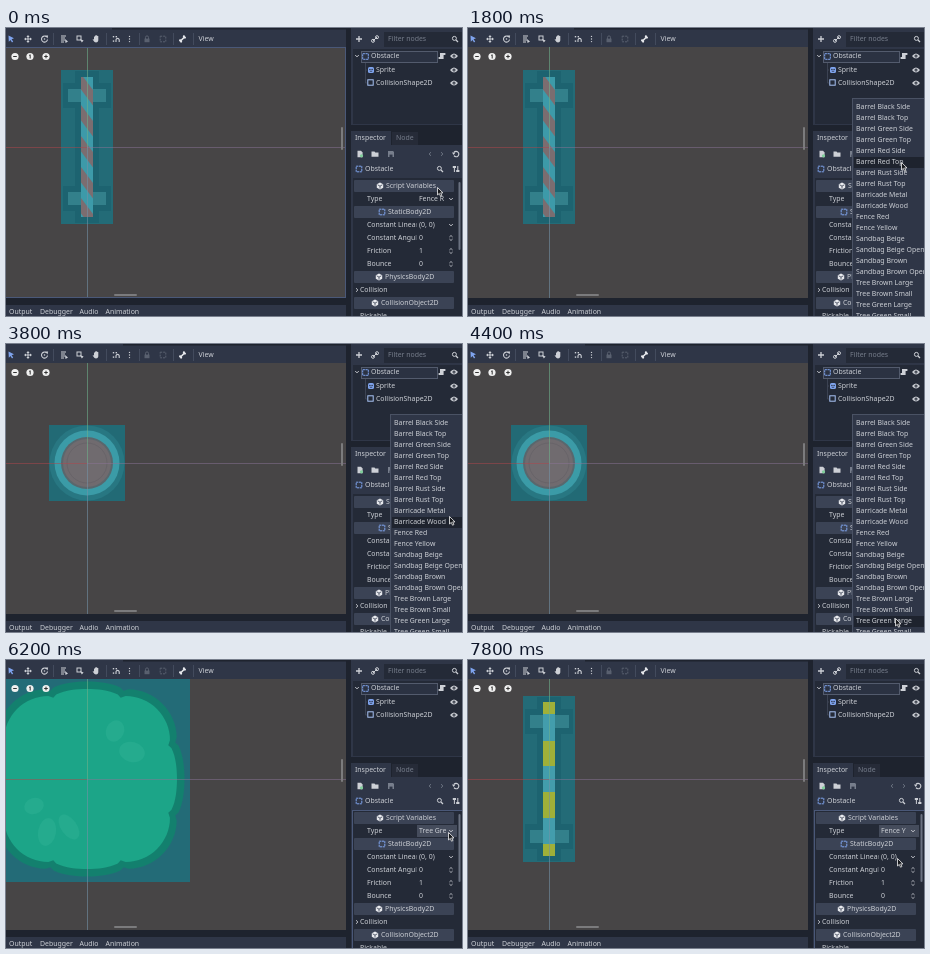
Recreate the animation shown at these times as an HTML page. Size 456 by 288 pixels, loop 8.2 s.

```html
<!DOCTYPE html>
<html lang="en">
<head>
<meta charset="utf-8">
<title>Obstacle inspector</title>
<style>
html, body { margin: 0; width: 100%; height: 100%; overflow: hidden; background: #202531; }
svg { display: block; width: 456px; height: 288px; }
text { font: 6.93px "Noto Sans", "Open Sans", sans-serif; fill: #cdd0d6; white-space: pre; }
</style>
</head>
<body>
<svg id="stage" viewBox="0 0 456 288" xmlns="http://www.w3.org/2000/svg"></svg>
<script>
const BASE = '#2f3647', DARK = '#242a37', DEEP = '#1e232e', HEAD = '#3b4355';
const TEXT = '#cdd0d6', DIM = '#777e8c', BLUE = '#7fa4ee';
const LOOP = 8200, STEP = 1000 / 15;

// Markup helpers
const rect = (x, y, w, h, fill, more = '') =>
  `<rect x="${x}" y="${y}" width="${w}" height="${h}" fill="${fill}" ${more}/>`;
const circle = (x, y, r, fill, more = '') =>
  `<circle cx="${x}" cy="${y}" r="${r}" fill="${fill}" ${more}/>`;
const line = (d, stroke = TEXT, width = 1, more = '') =>
  `<path d="${d}" fill="none" stroke="${stroke}" stroke-width="${width}" ${more}/>`;
const shape = (d, fill = TEXT) => `<path d="${d}" fill="${fill}"/>`;
const label = (x, y, s, fill = TEXT, more = '') =>
  `<text x="${x}" y="${y + 2.3}" style="fill:${fill}" ${more}>${s}</text>`;
const group = (id, body, more = '') => `<g id="${id}" ${more}>${body}</g>`;
const at = (x, y, body) => `<g transform="translate(${x} ${y})">${body}</g>`;

// Icons, centred on 0,0
const icon = {
  arrow: shape('M-2.5-3.5L3-.8.6.3 2.2 2.6 1 3.4-.5 1.1-2.2 2.8Z', BLUE),
  move: line('M-3 0H3M0-3V3', TEXT, 1) + shape('M0-4L1.6-2H-1.6ZM0 4L1.6 2H-1.6ZM-4 0L-2-1.6V1.6ZM4 0L2-1.6V1.6Z'),
  rotate: line('M2-2.2A3 3 0 1 0 3 .5', TEXT, 1.1) + shape('M.6-3.6L3.6-3.4 3-.6Z') + circle(0, 0, .8, TEXT),
  list: line('M-3-3H2M-3-1H1M-3 1H1M-3 3H0', TEXT, 1.1) + shape('M1 0L4 2.4 1.5 4Z'),
  pivot: rect(-3, -3, 4, 4, 'none', `stroke="${TEXT}"`) + shape('M0 0L3.6 1.6 1.8 3.6Z'),
  hand: shape('M-2-1V-2.4H-1V-3.4H.2V-3.8H1.2V-3H2.3V1.5Q2 3.6 0 3.6-1.6 3.4-3.4.4L-2.6 0-2 1Z'),
  snap: rect(-3.2, -3, 1.4, 1.4, TEXT) + rect(-.4, -3, 1.4, 1.4, TEXT) + rect(-3.2, 1.4, 1.4, 1.4, TEXT) +
        line('M0 3V1A1.6 1.6 0 0 1 3.2 1V3', TEXT, 1.1),
  dots: circle(0, -2.6, .7, TEXT) + circle(0, 0, .7, TEXT) + circle(0, 2.6, .7, TEXT),
  lock: rect(-2.5, -.4, 5, 3.6, '#59606f') + line('M-1.5 0V-1.6A1.5 1.5 0 0 1 1.5-1.6V0', '#59606f'),
  frame: rect(-2.8, -2.8, 5.6, 5.6, 'none', 'stroke="#59606f" stroke-dasharray="2 1"'),
  bone: line('M-2 2L2-2', '#e8eaee', 1.6) + circle(-2.4, 1.4, 1.1, '#e8eaee') + circle(-1.4, 2.6, 1.1, '#e8eaee') +
        circle(2.4, -1.4, 1.1, '#e8eaee') + circle(1.4, -2.6, 1.1, '#e8eaee'),
  plus: line('M-3 0H3M0-3V3', TEXT, 1.3),
  link: line('M-.6.6L2-2M-2 2L.6-.6', TEXT, 1) + circle(2, -1.8, 1.5, 'none', `stroke="${TEXT}"`) +
        circle(-2, 1.8, 1.5, 'none', `stroke="${TEXT}"`),
  lens: circle(-.6, -.6, 2, 'none', `stroke="${TEXT}"`) + line('M1 1L3 3', TEXT, 1.3),
  script: shape('M-2-3H3.4V-1H1.6V3H-3.4V1H-2Z'),
  eye: shape('M-4 0Q0-5 4 0 0 5-4 0Z') + circle(0, 0, 1.5, DARK) + circle(0, 0, .6, TEXT),
  body: rect(-2.8, -2.8, 5.6, 5.6, 'none', `stroke="${BLUE}" stroke-dasharray="2.2 .6"`),
  box: rect(-2.7, -2.7, 5.4, 5.4, 'none', 'stroke="#a9c4f5"'),
  cube: shape('M0-3.6L3.2-1.8V1.8L0 3.6-3.2 1.8V-1.8Z', '#e8eaee') + line('M-2.4-1.2L0 .1 2.4-1.2M0 0V2.7', HEAD, .8),
  sprite: rect(-3, -3, 6, 6, BLUE, 'rx="1.6"') + circle(-1.1, -.5, .7, DARK) + circle(1.1, -.5, .7, DARK) +
          line('M-1.2 1.3H1.2', DARK, .7),
  page: shape('M-2.5-3.3H1L2.6-1.6V3.3H-2.5Z') + circle(1.5, 1.8, 1.6, '#7fcf9a'),
  folder: shape('M-3.5-2.6H-.5L.3-1.6H3.5V2.8H-3.5Z'),
  disk: shape('M-3-3H2L3-2V3H-3Z', DIM) + rect(-1.5, .6, 3, 2.4, BASE),
  history: line('M-2-1.6A2.7 2.7 0 1 1-2 1.7', TEXT, 1.1) + shape('M-4-1.5H-.6L-2.3 1Z'),
  tools: line('M-1.6-3V3M1.8-3V3', TEXT, 1) + shape('M-3.2-1H0V-3H-3.2ZM.2 1H3.4V3H.2Z'),
  down: line('M-1.8-1L0 .9 1.8-1', TEXT, .9),
  right: line('M-1-1.8L.9 0-1 1.8', TEXT, .9),
  left: line('M1-1.8L-.9 0 1 1.8', DIM, .9),
  spin: line('M-1.6-1L0-2.5 1.6-1M-1.6 1L0 2.5 1.6 1', TEXT, .8)
};
const put = (name, x, y) => at(x, y, icon[name]);

function redFence() {
  let stripes = '';
  for (let y = 15; y < 200; y += 31) stripes += `M75 ${y}l12 16v15.5l-12-16Z`;
  const posts = [61, 164].map(y => rect(57, y - 6, 48, 25, '#1d6370') +
    rect(62, y, 13, 13, '#33808b') + rect(87, y, 13, 13, '#33808b')).join('');
  return rect(55, 42, 52, 154, '#236b77') + rect(69, 43, 24, 152, '#1d6370') + posts +
    rect(75, 49, 12, 140, '#3d9aa9') +
    `<clipPath id="beam"><rect x="75" y="49" width="12" height="140"/></clipPath>
     <g clip-path="url(#beam)">${shape(stripes, '#7b6d70')}</g>`;
}

function yellowFence() {
  const posts = [55, 170].map(y => rect(57, y - 6, 48, 25, '#1d6370') + rect(62, y, 39, 13, '#33808b')).join('');
  const bands = [[42, 12], [81, 25], [132, 26], [184, 12]];
  return rect(55, 36, 52, 166, '#236b77') + rect(69, 37, 24, 164, '#1d6370') + posts +
    rect(75, 42, 12, 154, '#439dac') +
    bands.map(([y, h]) => rect(75, y, 12, h, '#9fb039')).join('');
}

function barrel() {
  return rect(43, 81, 76, 76, '#226a75') + circle(81, 119, 37.5, '#287782') +
    circle(81, 119, 32.5, '#3b9ba7') + circle(81, 119, 26, '#59676d') +
    circle(81, 119, 24, '#706b6f') + circle(81, 119, 20, 'none', 'stroke="#686469"');
}

// Eight lobes, longer on the diagonals
function blob(inset) {
  const pts = [];
  for (let a = 0; a < 360; a += 2.5) {
    const t = a * Math.PI / 180;
    const r = 91 + 6.5 * Math.sqrt(Math.abs(Math.cos(4 * t))) + 9 * Math.sin(2 * t) ** 2 - inset;
    pts.push((81 + r * Math.cos(t)).toFixed(1) + ' ' + (119 + r * Math.sin(t)).toFixed(1));
  }
  return 'M' + pts.join('L') + 'Z';
}

function tree() {
  const spots = [[109, 71, 9, 11, 25], [126, 92, 13, 10, 15], [28, 146, 10, 8, -20], [41, 172, 9, 14, 10], [63, 167, 8, 14, -35]];
  return rect(-22, 19, 206, 203, '#236b77') + shape(blob(0), '#13806e') + shape(blob(7.5), '#1ca588') +
    spots.map(([x, y, rx, ry, turn]) =>
      `<ellipse rx="${rx}" ry="${ry}" transform="translate(${x} ${y}) rotate(${turn})" fill="#25ab8e"/>`).join('');
}

function viewport() {
  const tools = [['arrow', 5], ['move', 22], ['rotate', 38.5], ['list', 58], ['pivot', 74], ['hand', 90],
    ['snap', 110], ['dots', 123.5], ['lock', 141], ['frame', 157], ['bone', 176.5]];
  const zoom = [9, 24, 40].map((x, i) => circle(x, 28.5, 3.6, '#f0f0f0') +
    line(['M-1.8 0H1.8', 'M-.8-1L.2-1.8V2', 'M-1.8 0H1.8M0-1.8V1.8'][i], '#333', 1,
      `transform="translate(${x} 28.5)"`)).join('');
  return rect(0, 0, 340, 19, BASE) + rect(0, 0, 240, 1.5, DEEP, 'id="tabs"') +
    tools.map(([n, x]) => put(n, x, 11)).join('') +
    line('M47.5 5V17M100.5 5V17M133.5 5V17M167.5 5V17M187.5 5V17', '#434b5d', 1) + label(192.5, 11, 'View') +
    rect(0, 19, 340, 251, '#474546') +
    `<clipPath id="view"><rect y="19" width="340" height="251"/></clipPath>` +
    group('sprites', group('s0', redFence()) + group('s1', barrel()) + group('s2', tree()) + group('s3', yellowFence()),
      'clip-path="url(#view)"') +
    line('M0 119.5H81', '#b0474c', 1, 'opacity=".5"') +
    line('M81 119.5H340', '#8a7595', 1, 'opacity=".5"') +
    line('M81.5 19V119', '#6fb08a', 1, 'opacity=".6"') +
    line('M81.5 119V270', '#7492a5', 1, 'opacity=".6"') + zoom +
    rect(108, 266, 23, 2, '#7b7b7d', 'rx="1"') + rect(335, 99, 2, 23, '#7b7b7d', 'rx="1"') +
    rect(-1, 19.5, 340.5, 250, 'none', 'id="viewFocus" stroke="#4a5878"') +
    rect(0, 277, 340, 11, BASE) +
    [[3, 'Output'], [34, 'Debugger'], [73.5, 'Audio'], [99.5, 'Animation']].map(([x, s]) => label(x, 284, s)).join('');
}

function sceneDock() {
  return rect(345, 0, 111, 97, BASE) + put('plus', 353, 11) + put('link', 369, 11) +
    rect(378, 4, 78, 15, DARK) + label(382, 11, 'Filter nodes', DIM) + put('lens', 449, 11) +
    rect(347, 21, 109, 75, DARK) +
    rect(355.5, 23.5, 76, 11, '#2b3242', 'stroke="#535b6d"') +
    line('M359.5 35V55H361M359.5 42H361', '#3c4353', 1) +
    put('down', 351, 28) + put('body', 359.5, 28.5) + label(365, 28, 'Obstacle') +
    put('sprite', 365, 42) + label(370, 41.7, 'Sprite') +
    put('box', 364.5, 54.5) + label(370, 54.4, 'CollisionShape2D') +
    put('script', 436, 28) + [28, 42, 55].map(y => put('eye', 448, y)).join('');
}

function inspector() {
  const head = (y, s, x, name) => rect(348, y - 6, 100, 12, HEAD, 'rx="1"') + put(name, x - 6, y) + label(x, y, s);
  const row = (y, name, value, mark) => label(361, y, name, TEXT, 'clip-path="url(#names)"') +
    label(413, y, value) + put(mark, 445, y);
  return rect(345, 103, 40, 15, BASE) + rect(386, 104, 26, 13, '#262b38') +
    label(349, 110, 'Inspector') + label(390, 110, 'Node', DIM) +
    rect(345, 117, 111, 171, BASE) + put('page', 354, 126) + put('folder', 369, 126) + put('disk', 385, 126) +
    put('left', 424, 126) + at(436, 126, line('M-1-1.8L.9 0-1 1.8', DIM, .9)) + put('history', 450, 126) +
    put('body', 353, 141) + label(359, 141, 'Obstacle') + put('lens', 434, 141) + put('tools', 450, 141) +
    rect(347, 150, 109, 138, DARK) +
    '<clipPath id="names"><rect x="348" y="150" width="62.5" height="138"/></clipPath>' +
    '<clipPath id="value"><rect x="411" y="164" width="30" height="14"/></clipPath>' +
    head(158, 'Script Variables', 380, 'cube') +
    rect(411, 165, 40, 12, '#454c5c', 'id="field"') +
    label(361, 171, 'Type') + label(413, 171, '', TEXT, 'id="type" clip-path="url(#value)"') + put('down', 445, 171) +
    head(184, 'StaticBody2D', 382, 'body') +
    row(197, 'Constant Linear', '(0, 0)', 'down') + row(210, 'Constant Angular', '0', 'spin') +
    row(223, 'Friction', '1', 'spin') + row(236, 'Bounce', '0', 'spin') +
    head(249, 'PhysicsBody2D', 379, 'cube') +
    put('right', 351, 262) + label(354, 262, 'Collision') +
    head(275, 'CollisionObject2D', 375, 'cube') + label(354, 288, 'Pickable') +
    rect(452.5, 154, 2, 68, '#6b7281', 'rx="1"') +
    rect(346.5, 150.5, 112, 140, 'none', 'id="focus" stroke="#4a5878"');
}

const kinds = ['Barrel Black', 'Barrel Green', 'Barrel Red', 'Barrel Rust'].flatMap(s => [s + ' Side', s + ' Top'])
  .concat('Barricade Metal', 'Barricade Wood', 'Fence Red', 'Fence Yellow')
  .concat(['Sandbag Beige', 'Sandbag Brown'].flatMap(s => [s, s + ' Open']))
  .concat(['Tree Brown', 'Tree Green'].flatMap(s => [s + ' Large', s + ' Small']));

function menu() {
  return rect(384.5, 70.5, 80, 230, BASE, 'stroke="#4a5264"') +
    rect(386, 74, 70, 11, DEEP, 'id="hover"') +
    kinds.map((s, i) => label(388, 79 + 11 * i, s)).join('');
}

const stage = document.getElementById('stage');
stage.innerHTML = rect(0, 0, 456, 288, DEEP) + viewport() + sceneDock() + inspector() + group('menu', menu()) +
  group('cursor', '<path d="M.5.5V8L2.3 6.4 3.5 9.2 4.9 8.6 3.7 5.9H6Z" fill="#16181c" stroke="#f4f4f4" stroke-width=".8"/>');

const get = id => document.getElementById(id);
const show = (id, on) => get(id).setAttribute('visibility', on ? 'visible' : 'hidden');

// Pointer keys: step, x, y
const path = [
  [0, 431, 159], [6, 442, 175], [9, 443, 171], [21, 443, 171], [27, 433, 134], [38, 433, 134],
  [41, 437, 158], [43, 437, 158], [46, 441, 164], [49, 441, 164], [51, 443, 169], [56, 443, 169],
  [66, 427, 274], [76, 427, 274], [77, 426, 274], [80, 426, 274], [86, 445, 181], [88, 445, 181],
  [93, 442, 172], [97, 442, 172], [103, 434, 188], [109, 434, 188], [113, 429, 198], [123, 429, 198]
];
// Menu spans: opened, first hover, closed
const spans = [[15, 22, 33], [53, 57, 72], [95, 98, 117]];
const swaps = [0, 34, 72, 117];
const values = ['Fence Red', 'Barrel Red Top', 'Tree Green Large', 'Fence Yellow'].map((s, i) => s.slice(0, [7, 8, 8, 7][i]));

function pointer(n) {
  const i = path.findIndex((k, j) => j > 0 && n <= k[0]);
  const [a, ax, ay] = path[i - 1], [b, bx, by] = path[i];
  const u = (n - a) / (b - a), e = u * u * (3 - 2 * u);
  return [ax + (bx - ax) * e, ay + (by - ay) * e];
}

function draw(ms) {
  const n = Math.floor((ms % LOOP + 4) / STEP) % 123;
  const [x, y] = pointer(n).map(Math.round);
  const open = spans.find(([from, , to]) => n >= from && n < to);
  const kind = swaps.filter(s => n >= s).length - 1;

  for (let i = 0; i < 4; i++) show('s' + i, i === kind);
  get('type').textContent = values[kind];
  // The scene tab widens once the scene is modified
  get('tabs').setAttribute('x', kind ? 117 : 106);
  show('viewFocus', n < spans[0][0]);
  show('field', n >= 33);
  show('focus', n >= 33 && !open);
  get('menu').style.display = open ? '' : 'none';
  get('hover').setAttribute('y', 74 + 11 * Math.floor((y - 73) / 11));
  get('hover').style.display = open && n >= open[1] ? '' : 'none';
  get('cursor').setAttribute('transform', `translate(${x} ${y})`);
}

const start = performance.now();
function tick() {
  draw(performance.now() - start);
  requestAnimationFrame(tick);
}
tick();
</script>
</body>
</html>
```
